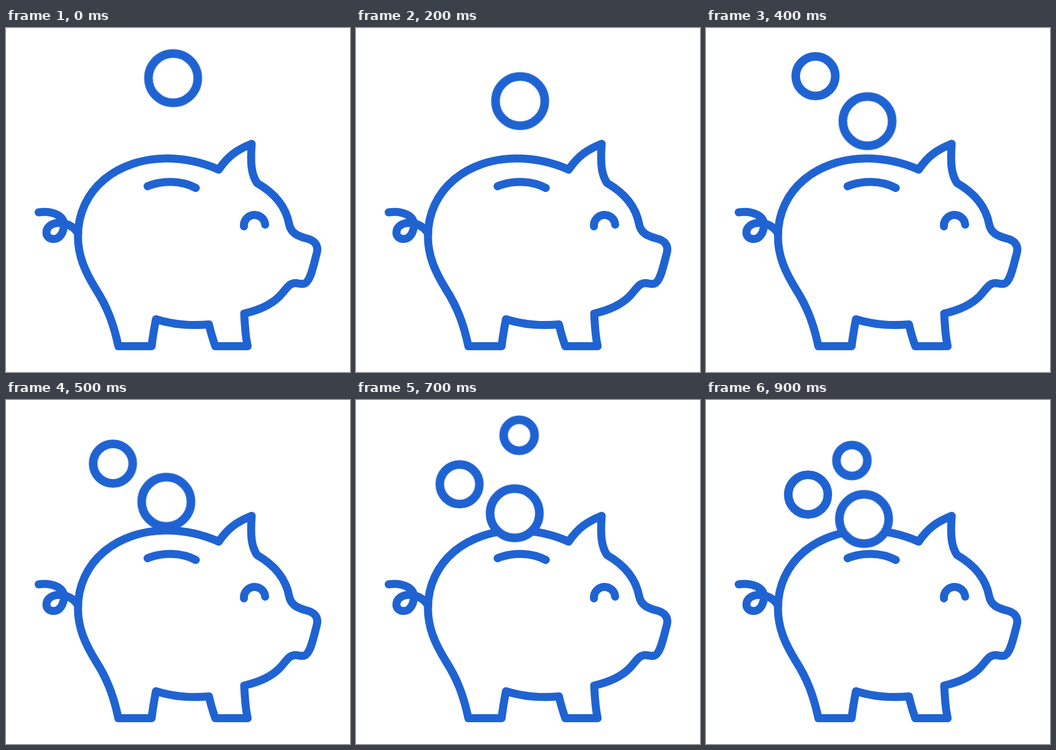
An HTML page that plays this animation: 600x600 px, repeating every 1 s.

```html
<!DOCTYPE html>
<html lang="en">
<head>
<meta charset="utf-8">
<title>Piggy bank</title>
<style>
  html, body { margin: 0; width: 100%; height: 100%; overflow: hidden; background: #fff; }
  svg { display: block; width: 100%; height: 100%; }
  .pig { fill: none; stroke: #1f63d3; stroke-width: 14; stroke-linecap: round; stroke-linejoin: round; }
  .coin { fill: #fff; stroke: #1f63d3; stroke-width: 15; animation: 1s steps(3) infinite; }
  .large { animation-name: large; }
  .medium { animation-name: medium; }
  .small { animation-name: small; }

  /* Coins move in 100 ms ticks and slow down as they near the slot. */
  @keyframes large {
    0% { transform: translate(291.5px, 87.5px); }
    30% { transform: translate(283.7px, 147.5px); }
    60% { transform: translate(277.5px, 192.5px); animation-timing-function: steps(4); }
    100% { transform: translate(275px, 212.5px); }
  }
  @keyframes medium {
    0% { opacity: 0; transform: translate(195.5px, 57px); animation-timing-function: step-end; }
    30% { opacity: 1; transform: translate(195.5px, 57px); }
    60% { opacity: 1; transform: translate(182px, 138px); animation-timing-function: steps(4); }
    100% { opacity: 1; transform: translate(176.6px, 174px); }
  }
  @keyframes small {
    0% { opacity: 0; transform: translate(299.5px, 39.5px); animation-timing-function: step-end; }
    60% { opacity: 1; transform: translate(299.5px, 39.5px); animation-timing-function: steps(4); }
    100% { opacity: 1; transform: translate(239.5px, 127.5px); }
  }
</style>
</head>
<body>
<svg viewBox="0 0 600 600">
  <g class="pig">
    <path d="M371 247 C344 235 313 227.5 280 227.5 C194 227.5 125.5 282 125.5 363
      C125.5 398 138 425 157 456 C175 484 187 513 196 555 L254 555
      Q256 537 261.500 508 C290 517 320 520 354 517 Q358 535 365 555 L421.500 555
      C418 540 416.500 520 415.500 498 C442 492 462 483 477 468 C490 454 494 444 506 445
      C514 446 516 447 520 446 C531 443 536 415 542 393 C546 378 537 370 524 367
      C508 363 497 357 494 343 C489 315 472 290 438 270.500 C428 256 426 236 428.500 202
      C404 212 388 222 371 247 Z"/>
    <path d="M57 321.500 C80 318 101 327 101 343 C101 356 94 368 83.500 368
      C75 368 70.500 363 70.500 357 C70.500 346 81 340 92 340 C108 340 120 348 126 359"/>
    <path d="M247 276 C272 265.500 306 265.500 331 279"/>
    <path d="M415 346 A18.550 18.550 0 0 1 452 343"/>
  </g>
  <circle class="coin large" r="43"/>
  <circle class="coin medium" r="34.5"/>
  <circle class="coin small" r="27"/>
</svg>
</body>
</html>
```
